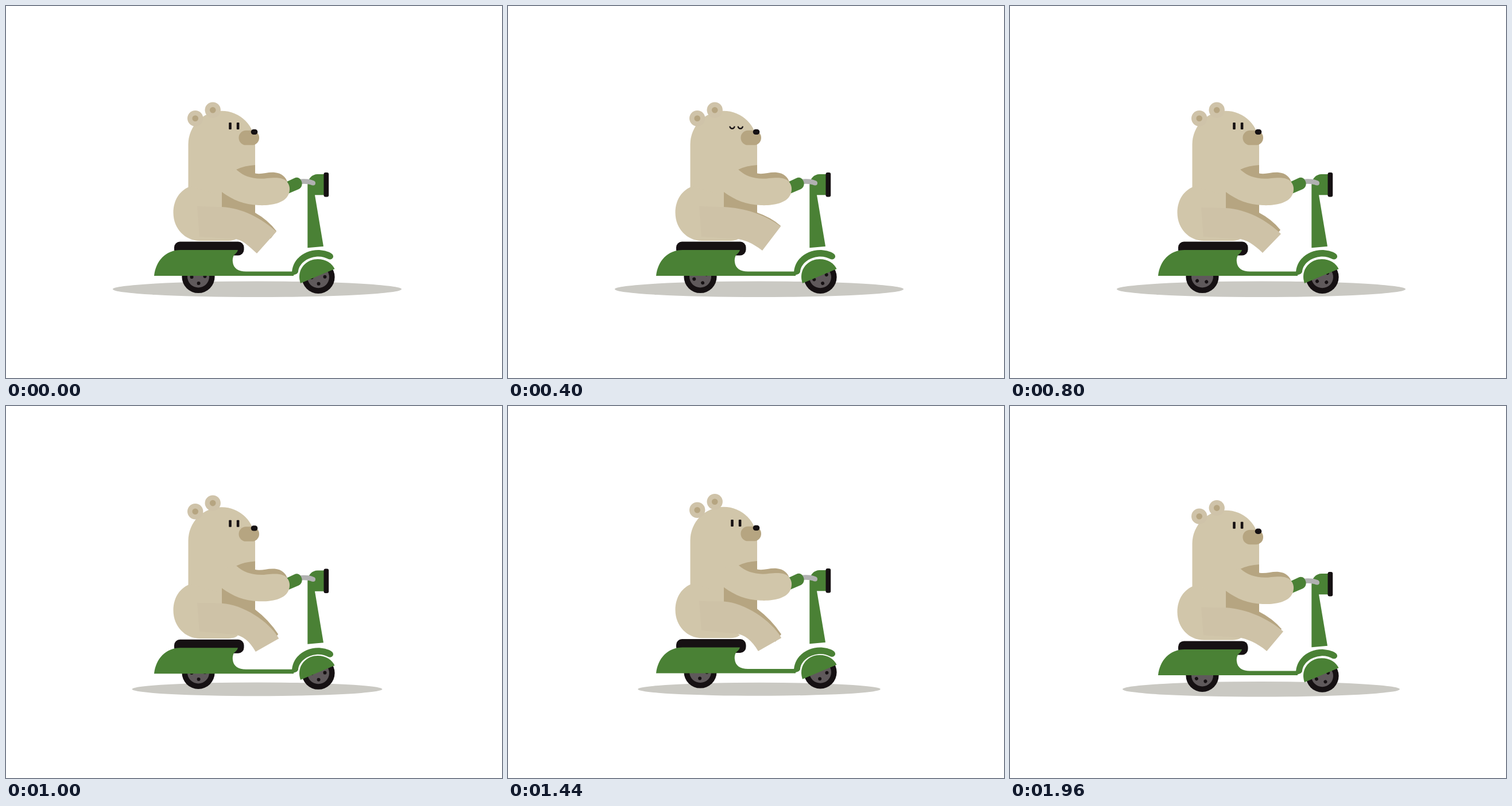
Write an HTML page that moves like this. It is 864x648 px and loops after 2 s.

```html
<!DOCTYPE html>
<html lang="en">
<head>
<meta charset="utf-8">
<title>Bear on a scooter</title>
<style>
html, body { margin: 0; height: 100%; overflow: hidden; background: #fff; }
svg { display: block; width: 864px; height: 648px; }
.fur { fill: #d1c6aa; }
.leg { fill: #cec2a7; }
.tan { fill: #b6a581; }
.green { fill: #4a8135; }
.ink { fill: #161113; }
</style>
</head>
<body>
<svg viewBox="0 0 864 648">
  <defs>
    <g id="wheel">
      <circle class="ink" r="28.6"/>
      <circle r="19" fill="#5f595b"/>
    </g>
    <g id="dots" class="ink">
      <circle cx="11.5" r="3"/><circle cx="-11.5" r="3"/>
      <circle cy="11.5" r="3"/><circle cy="-11.5" r="3"/>
    </g>
    <g id="ear">
      <circle r="13.7" fill="#cfc3a9"/>
      <circle class="tan" r="5.3"/>
    </g>
  </defs>

  <ellipse id="shadow" cx="437.5" cy="493.3" fill="#cac9c3"/>

  <!-- data-lift: how far a part rises at the top of a bounce; data-soft: eased -->
  <g data-lift="8.5">
    <g transform="translate(335 471.5)"><use href="#wheel"/><use href="#dots" class="spin"/></g>
    <g transform="translate(544 472.3)"><use href="#wheel"/><use href="#dots" class="spin"/></g>
  </g>
  <path class="green" data-lift="7.3" d="M513 483C505 460 522 441 543 441C557 441 568 448 572.5 458Z"/>
  <g data-lift="4.5">
    <rect class="ink" x="293" y="410.5" width="121.5" height="24" rx="10"/>
    <path class="green" d="M258 470C261 444 278 425 304 425H404C403 429 400 431 397 434Q394 440 395 446C396 457 405 462.5 418 462.5H501V470Z"/>
    <path class="green" d="M498 468C497 442 520 424 546 425C556 426 563 428 568 432C573 437 568 443 562 441C556 438 550 436 542 436.5C523 438 510 450 509 463Q508 467 501 468.5Z"/>
  </g>
  <g data-lift="7" data-soft>
    <path class="green" d="M525.3 421.3V312C525.3 301 533 293 543 293H556V329.3H538L553 418.8Z"/>
    <rect class="ink" x="553.5" y="290" width="8.7" height="42.5" rx="3"/>
    <path d="M510 306C520 305 528 305 535 308.5" fill="none" stroke="#b1b1b1" stroke-width="8.5"/>
    <circle cx="535" cy="308.5" r="4" fill="#b1b1b1"/>
    <path class="green" d="M486 307.5L502 300C508 297 513 300 515 306C517 312 514 317 510 319L490 327.5Z"/>
  </g>

  <path class="fur" data-lift="7" data-soft d="M317.5 340V241A58.2 58.2 0 0 1 434 241V345H376V370H317.5Z"/>
  <path class="fur" data-lift="4.8" d="M322 314C303 320 291.5 338 291.5 360C291.5 388 312 409 338 409H384C395 409 400 407 404 404L376 385V330Z"/>
  <g class="tan" data-lift="7" data-soft>
    <path d="M376 300H434V366H376Z"/>
    <path d="M401 285Q415 278 434 277V291.5C445 294 455 289 468 290C480 291 488 298 490.5 308L440 315Z"/>
  </g>
  <path class="tan" id="backLeg"/>
  <path class="leg" id="frontLeg"/>
  <path class="fur" data-lift="8.2" d="M401 285C415 298 435 303 455 300C475 298 485 300 490 307C496 314 495 325 490 332C482 344 460 348 440 347C415 346 395 338 376 324V290Z"/>

  <g data-lift="14.5">
    <use href="#ear" x="329.7" y="195.8"/>
    <use href="#ear" x="360.2" y="181.2"/>
  </g>
  <g data-lift="7" data-soft>
    <rect class="tan" x="405.5" y="216.8" width="35.5" height="25.5" rx="12.5"/>
    <rect class="ink" x="426.7" y="214.7" width="11.6" height="9.3" rx="4.6"/>
  </g>
  <g data-lift="5">
    <g id="open" class="ink">
      <rect x="388.2" y="203" width="4.6" height="12" rx="1"/>
      <rect x="401.8" y="203" width="4.6" height="12" rx="1"/>
    </g>
    <path id="closed" d="M386.5 209.5a4 4 0 0 0 8 0M400.8 209.5a4 4 0 0 0 8 0" fill="none" stroke="#161113" stroke-width="2.4"/>
  </g>
</svg>
<script>
const LOOP = 2000, STEP = 40, BOUNCE = 400, PEAK = 240, BLINK = 1000;
const $ = id => document.getElementById(id);
const lifted = document.querySelectorAll('[data-lift]');
const spinning = document.querySelectorAll('.spin');

// time, hip y, front leg top x/y and bottom x/y, back leg tip x/y
const legKeys = [
  [0, 350, 471, 393, 437, 431, 471, 392],
  [400, 350, 475, 384, 443, 426, 475, 383],
  [800, 352, 472, 397, 440, 430, 471, 390],
  [1200, 354, 477, 392, 448, 427, 474, 385],
  [1600, 350, 474, 391, 446, 428, 474, 386],
  [1960, 354, 475.8, 389.5, 450, 427, 472.6, 385.5],
  [2000, 350, 471, 393, 437, 431, 471, 392]
];
const legBounce = [0, -11, 1, 12.5, -11, -0.5, 2, 12];

// Rise to the peak, then a quicker drop
function height(t) {
  const p = t % BOUNCE;
  return p < PEAK ? p / PEAK : (BOUNCE - p) / (BOUNCE - PEAK);
}

const soften = h => h * h * (3 - 2 * h);

function legPose(t, h) {
  const i = legKeys.findIndex(k => k[0] > t);
  const a = legKeys[i - 1], b = legKeys[i];
  const u = (t - a[0]) / (b[0] - a[0]);
  return a.map((v, n) => v + (b[n] - v) * u + legBounce[n] * h);
}

function drawLegs(t, h) {
  const [, hip, tx, ty, bx, by, kx, ky] = legPose(t, h);
  const len = Math.hypot(tx - bx, ty - by);
  const nx = (by - ty) / len, ny = (tx - bx) / len;
  $('frontLeg').setAttribute('d',
    `M333 ${hip - 1}L376 ${hip}C412 ${hip + 2} ${tx - nx * 35} ${ty - ny * 35} ${tx} ${ty}L${bx} ${by}` +
    `C${bx - nx * 22} ${by - ny * 22} 412 ${407 - 9 * h} 397 ${405.5 - 9 * h}L337 ${402 - 11 * h}Z`);
  const y = 359.5 - 7 * h;
  $('backLeg').setAttribute('d',
    `M400 ${y - 3}L433 ${y}Q${(434 + kx) / 2 + 4} ${(y + ky) / 2 - 3} ${kx} ${ky}l-10 13L400 ${y + 30}Z`);
}

function draw(now) {
  const t = Math.floor((now % LOOP) / STEP) * STEP;
  const h = height(t), soft = soften(h);
  for (const el of lifted) {
    const { lift, soft: eased } = el.dataset;
    el.setAttribute('transform', `translate(0 ${-lift * (eased === undefined ? h : soft)})`);
  }
  for (const el of spinning) el.setAttribute('transform', `rotate(${1260 * t / LOOP - 3})`);
  $('shadow').setAttribute('rx', 251.5 - 40.3 * h);
  $('shadow').setAttribute('ry', 13.8 - 2.3 * h);
  drawLegs(t, h);
  const p = t % BLINK, shut = p >= 200 && p < 440;
  $('open').style.display = shut ? 'none' : '';
  $('closed').style.display = shut ? '' : 'none';
}

let start;
function tick(now) {
  start ??= now;
  draw(now - start);
  requestAnimationFrame(tick);
}
draw(0);
requestAnimationFrame(tick);
</script>
</body>
</html>
```
